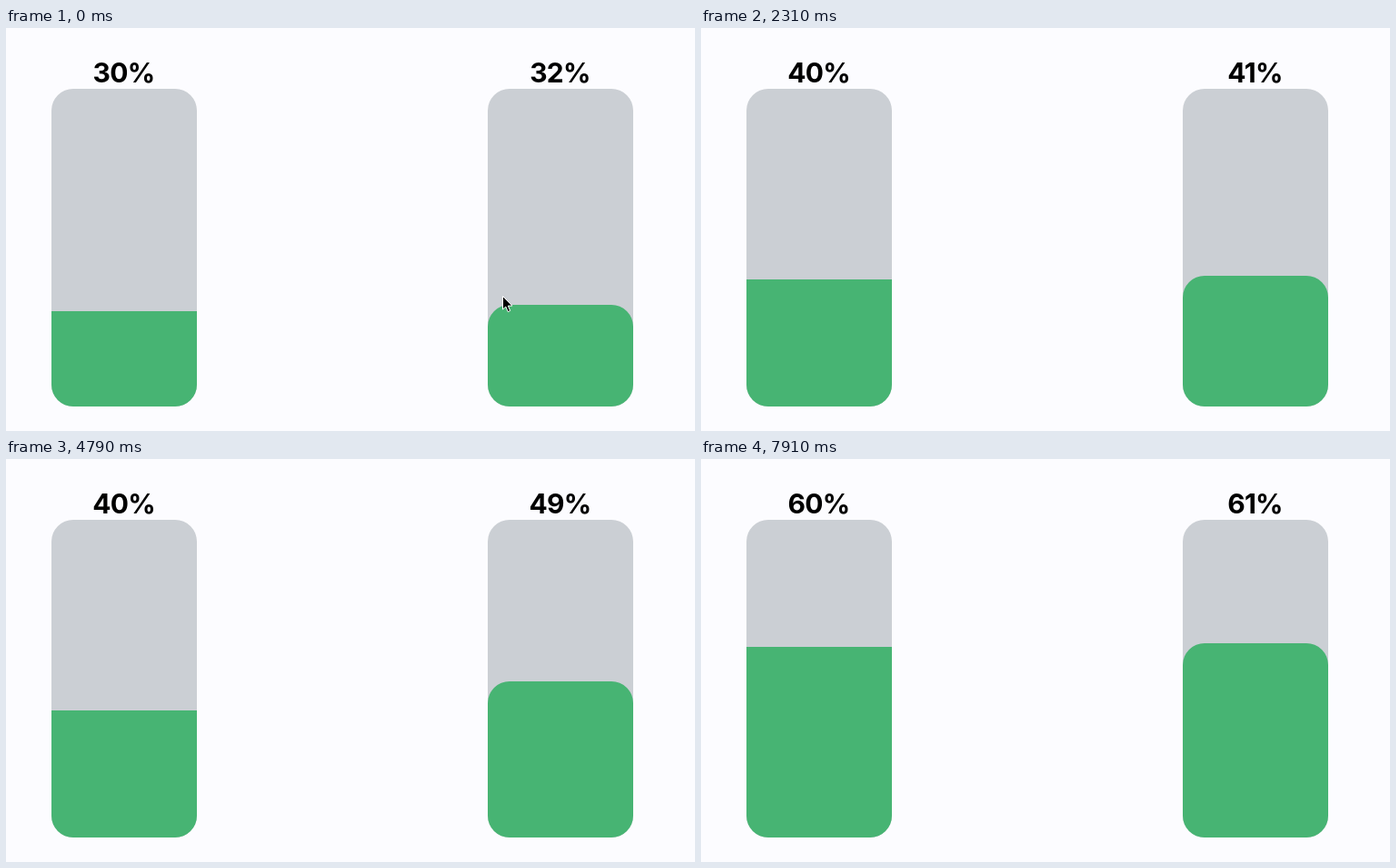
Animation, 758 px wide and 444 px high, one loop 8 s. Source, as an HTML page:

```html
<!DOCTYPE html>
<html lang="en">
<head>
<meta charset="utf-8">
<title>Progress bars</title>
<style>
  html, body { margin: 0; width: 100%; height: 100%; overflow: hidden; background: #fcfcff; }
  svg { display: block; width: 758px; height: 444px; }
  text { font: 700 30px Inter, sans-serif; letter-spacing: -.75px; text-anchor: middle; }
  .track { fill: #cbcfd4; }
  .fill { fill: #47b473; }
</style>
</head>
<body>
<svg viewBox="0 0 758 444">
  <clipPath id="clip"><rect x="50" y="67" width="160" height="350" rx="24"/></clipPath>
  <text id="leftText" x="129.5" y="60"></text>
  <g clip-path="url(#clip)">
    <rect class="track" x="50" y="67" width="160" height="350"/>
    <rect class="fill" id="leftFill" x="50" width="160"/>
  </g>
  <text id="rightText" x="609.5" y="60"></text>
  <rect class="track" x="530" y="67" width="160" height="350" rx="24"/>
  <rect class="fill" id="rightFill" x="530" width="160" rx="24"/>
  <path id="cursor" d="M.5 .5V15l3.3-3 2.4 5.6 2.5-1.1-2.4-5.4h4.6z" stroke="#fff" stroke-width="1"/>
</svg>
<script>
const LOOP = 8000, STEP = 281, FIRST = 20;
const LEAVE = 1980, LEAVE_TIME = 80;
const get = id => document.getElementById(id);

function setBar(name, percent) {
  const top = Math.floor(417 - 3.5 * percent);
  get(name + 'Text').textContent = percent + '%';
  get(name + 'Fill').setAttribute('y', top);
  get(name + 'Fill').setAttribute('height', 417 - top);
}

function draw(now) {
  const t = now % LOOP;
  const percent = 33 + Math.floor((t - FIRST) / STEP);
  setBar('right', percent);
  setBar('left', Math.floor(percent / 10) * 10); // advances only in tens

  // The pointer rests, then darts off to the right
  const p = Math.max(0, (t - LEAVE) / LEAVE_TIME);
  get('cursor').setAttribute('transform', `translate(${546 + 175 * p} ${295 + 20 * p})`);
  get('cursor').setAttribute('visibility', p > 1 ? 'hidden' : 'visible');
}

const start = performance.now();
function frame() {
  draw(performance.now() - start);
  requestAnimationFrame(frame);
}
frame();
</script>
</body>
</html>
```
